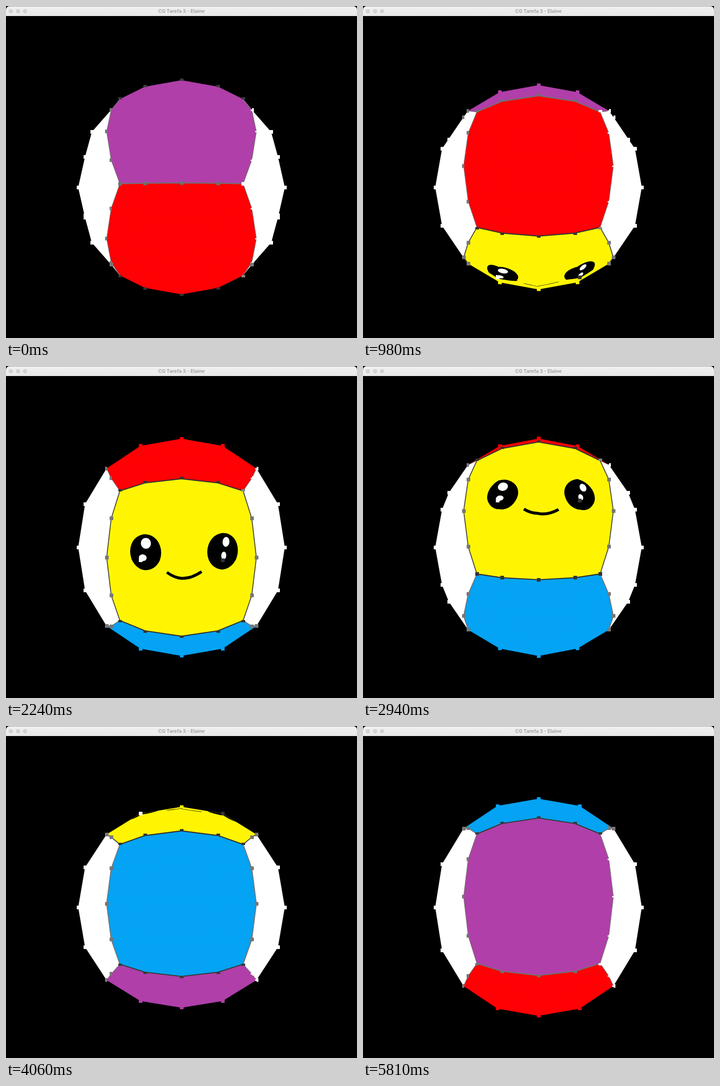
An HTML page with a canvas for the animation above (5880 ms loop, 769 by 728 pixels).

```html
<!DOCTYPE html>
<html lang="pt">
<head>
<meta charset="utf-8">
<title>CG Tarefa 3</title>
<style>
html, body { margin: 0; width: 100%; height: 100%; overflow: hidden; background: #000; }
canvas { position: absolute; left: 0; top: 0; }
header {
  position: absolute; left: 0; top: 0; width: 769px; height: 22px; box-sizing: border-box;
  border-radius: 8px 8px 0 0; border-top: 1px solid #a0a0a0;
  background: linear-gradient(#f0f0f0, #e9e9e9);
  font: bold 10.6px/21px Inter, sans-serif; color: #a4a4a4; text-align: center;
}
i {
  position: absolute; top: 6px; width: 9px; height: 9px; box-sizing: border-box;
  border-radius: 50%; background: #d4d4d4; border: 1px solid #c6c6c6;
}
</style>
</head>
<body>
<canvas id="stage" width="769" height="728"></canvas>
<header><i style="left:6px"></i><i style="left:22px"></i><i style="left:37px"></i>CG Tarefa 3 - Elaine</header>
<script>
const g = document.getElementById('stage').getContext('2d');
const CX = 384.5, CY = 397.5, STEP = 70, LOOP = 5880;

// Smoothed cube: height and tangent offset of a face's 5x5 grid, by |i|, |j|.
const HEIGHT = [[226, 211, 164], [211, 196, 154], [164, 154, 135]];
const OFFSET = [[0, 0, 0], [90, 85, 80], [164, 154, 135]];

// Around the ring: purple, red, yellow, blue; then the right and left caps.
const COLORS = ['#b03fa9', '#ff0004', '#fff503', '#04a3f3', '#fff', '#fff'];
const CROSS = ['#707070', '#333', '#333', '#3a3a3a'];   // seam below each ring face
const CORNER = ['#fff', '#888', '#333', '#3a3a3a'];     // right end of that seam
const SIDE = ['#777', '#777', '#484840', '#747474'];    // seam to the caps
const YELLOW = 2, RIGHT = 4, LEFT = 5;

// Step number and rotation in degrees.
const KEYS = [[0, -40.2], [14, 15.6], [23, 47.7], [42, 120], [58, 182.6], [70, 227], [83, 278.3]];

function angleAt(step) {
  const k = KEYS.findIndex(key => key[0] >= step);
  if (k < 1) return KEYS[0][1];
  const [s0, a0] = KEYS[k - 1], [s1, a1] = KEYS[k];
  return a0 + (a1 - a0) * (step - s0) / (s1 - s0);
}

function gridPoint(i, j) {
  const a = Math.abs(i), b = Math.abs(j);
  return { n: HEIGHT[a][b], u: Math.sign(i) * OFFSET[a][b], v: Math.sign(j) * OFFSET[b][a] };
}

let P, Q;   // vertical pull of the two model axes across the rotation axis

const normalY = f => [P, Q, -P, -Q][f];
const upY = f => [-Q, P, Q, -P][f];

function project(f, i, j) {
  const { n, u, v } = gridPoint(i, j);
  if (f > 3) return [CX + (f === RIGHT ? n : -n), CY - P * u - Q * v];
  return [CX + u, CY - normalY(f) * n - upY(f) * v];
}

const corners = (i, j) => [[i, j], [i + 1, j], [i + 1, j + 1], [i, j + 1]];
const quad = (f, i, j) => corners(i, j).map(c => project(f, ...c));

function cellVisible(f, i, j) {
  if (i < -2 || j < -2 || i > 1 || j > 1) return false;
  const [a, b, c, d] = quad(f, i, j);
  const area = (c[0] - a[0]) * (d[1] - b[1]) - (c[1] - a[1]) * (d[0] - b[0]);
  return (f === LEFT ? area : -area) > 0.01;
}

const pointVisible = (f, i, j) =>
  [[i, j], [i - 1, j], [i, j - 1], [i - 1, j - 1]].some(c => cellVisible(f, ...c));

// Cap grid position shared with row j of a ring face.
const capPoint = (f, j) => [[2, -j], [j, 2], [-2, j], [-j, -2]][f];

function trace(points) {
  points.forEach(([x, y], k) => k ? g.lineTo(x, y) : g.moveTo(x, y));
  g.closePath();
}

function box([x, y], color, x0 = -4, y0 = -4, x1 = 4, y1 = 4) {
  g.fillStyle = color;
  g.fillRect(Math.round(x + x0), Math.round(y + y0), x1 - x0, y1 - y0);
}

function line(a, b, color, width) {
  g.strokeStyle = color;
  g.lineWidth = width;
  g.beginPath();
  g.moveTo(...a);
  g.lineTo(...b);
  g.stroke();
}

function oval(x, y, rx, ry, color) {
  g.fillStyle = color;
  g.beginPath();
  g.ellipse(x, y, rx, ry, 0, 0, 7);
  g.fill();
}

// Eyes and mouth in flat face coordinates, y up.
function drawFeatures() {
  oval(-78.5, 16.5, 34, 37, '#000');
  oval(90, 18, 33.5, 37.5, '#000');
  oval(-78, 35, 11, 11, '#fff');
  oval(-85, 5.5, 8.5, 7, '#fff');
  oval(97.5, 37, 7.5, 10, '#fff');
  oval(92.5, 9.5, 5.5, 8, '#fff');
  g.strokeStyle = '#000';
  g.lineWidth = 6;
  g.beginPath();
  g.moveTo(-32, -24);
  g.quadraticCurveTo(4, -49, 44, -23);
  g.stroke();
}

// Lay the flat drawing onto one tilted cell.
function drawFeatureCell(i, j) {
  const [a, b, , d] = corners(i, j).map(c => gridPoint(...c));
  const u1 = b.u - a.u, v1 = b.v - a.v, n1 = b.n - a.n;
  const u2 = d.u - a.u, v2 = d.v - a.v, n2 = d.n - a.n;
  const det = u1 * v2 - u2 * v1;
  const nu = (n1 * v2 - n2 * v1) / det, nv = (u1 * n2 - u2 * n1) / det;
  const n0 = a.n - nu * a.u - nv * a.v, p = normalY(YELLOW);
  const points = quad(YELLOW, i, j);
  const mid = [0, 1].map(k => points.reduce((sum, q) => sum + q[k], 0) / 4);
  g.save();
  g.beginPath();
  trace(points.map(q => q.map((c, k) => mid[k] + (c - mid[k]) * 1.02)));   // overlap hides joins
  g.clip();
  g.transform(1, -p * nu, 0, -p * nv - upY(YELLOW), CX, CY - p * n0);
  drawFeatures();
  g.restore();
}

function eachCell(f, draw) {
  for (let i = -2; i < 2; i++)
    for (let j = -2; j < 2; j++)
      if (cellVisible(f, i, j)) draw(i, j);
}

function drawFaces() {
  for (let f = 0; f < 6; f++)
    for (let i = -1; i < 2; i++)
      for (let j = -1; j < 2; j++)
        if (pointVisible(f, i, j)) box(project(f, i, j), COLORS[f]);
  for (const f of [RIGHT, LEFT, 0, 1, 2, 3]) {
    g.beginPath();
    eachCell(f, (i, j) => trace(quad(f, i, j)));
    g.fillStyle = g.strokeStyle = COLORS[f];
    g.lineWidth = 0.6;
    g.fill();
    g.stroke();
  }
  eachCell(YELLOW, drawFeatureCell);
  if (pointVisible(YELLOW, -1, 0)) box(project(YELLOW, -1, 0), '#fff');
  if (pointVisible(YELLOW, 1, 0)) box(project(YELLOW, 1, 0), '#333');
}

function drawSideSeam(f) {
  const plain = f < 2;   // purple and red cover the inner half of their points
  for (const i of [-2, 2]) {
    const cap = i < 0 ? LEFT : RIGHT;
    for (let j = -2; j < 2; j++)
      if (cellVisible(f, i < 0 ? -2 : 1, j))
        line(project(f, i, j), project(f, i, j + 1), SIDE[f], plain ? 1.3 : 2);
    for (let j = -1; j < 2; j++) {
      if (!pointVisible(f, i, j) && !pointVisible(cap, ...capPoint(f, j))) continue;
      const p = project(f, i, j);
      if (!plain) box(p, '#777');
      else if (i < 0) box(p, '#777', -4, -4, 1);
      else {
        box(p, '#fff', 0);
        box(p, '#fff', -3, -1, 0, 2);
      }
    }
  }
}

function drawCrossSeam(f) {
  const next = (f + 1) % 4;
  for (let i = -2; i < 2; i++)
    if (cellVisible(f, i, -2) && cellVisible(next, i, 1))
      line(project(f, i, -2), project(f, i + 1, -2), CROSS[f], 2.4);
  for (let i = -2; i < 3; i++) {
    if (!pointVisible(f, i, -2) && !pointVisible(next, i, 2)) continue;
    const p = project(f, i, -2), dy = p[1] - CY;
    box(p, i === 2 ? CORNER[f] : CROSS[f], -4, dy > 85 ? -1 : -4, 4, dy < -85 ? 1 : 4);
  }
}

function frame(now) {
  const a = angleAt(Math.floor(now % LOOP / STEP)) * Math.PI / 180;
  P = 0.974 * Math.cos(a);
  Q = 1.063 * Math.sin(a);
  g.fillStyle = '#000';
  g.fillRect(0, 0, 769, 728);
  drawFaces();
  for (let f = 0; f < 4; f++) drawSideSeam(f);
  for (let f = 0; f < 4; f++) drawCrossSeam(f);
}

let start;
function tick(now) {
  start ??= now;
  frame(Math.max(0, now - start));
  requestAnimationFrame(tick);
}
requestAnimationFrame(tick);
</script>
</body>
</html>
```
